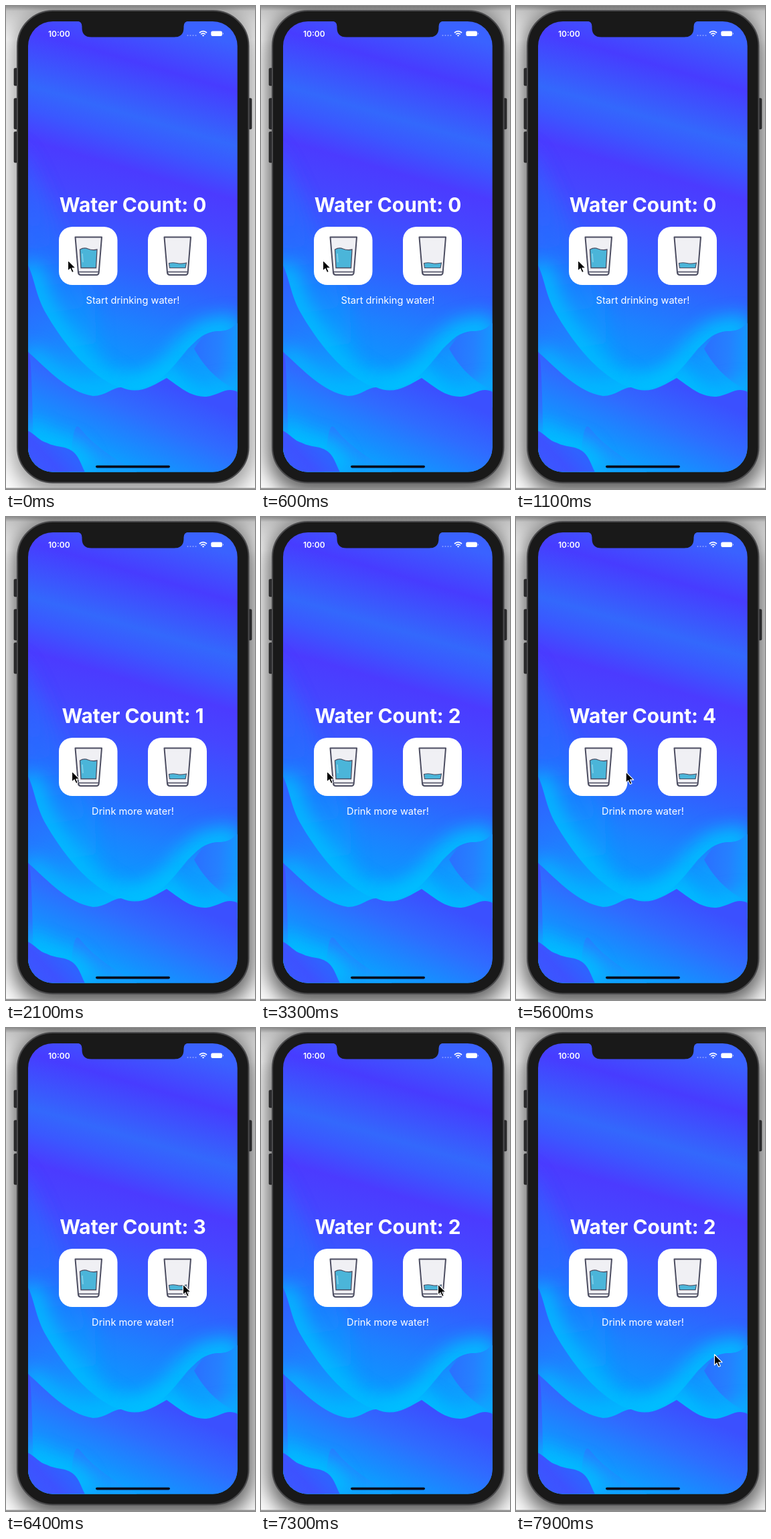
These frames come from a looping animation (372x722 px, 8 s). An HTML page:

```html
<!DOCTYPE html>
<html lang="en">
<head>
<meta charset="utf-8">
<style>
  html, body { margin: 0; width: 372px; height: 722px; overflow: hidden; background: #fff; }
  svg { display: block; }
  text { font-family: Inter, Roboto, sans-serif; fill: #fff; }
</style>
</head>
<body>
<svg width="372" height="722" viewBox="0 0 372 722">
  <defs>
    <filter id="blur" x="-30%" y="-20%" width="160%" height="140%"><feGaussianBlur stdDeviation="16"/></filter>
    <filter id="soft" x="-50%" y="-50%" width="200%" height="200%"><feGaussianBlur stdDeviation="14"/></filter>
    <clipPath id="screen"><rect x="33" y="23" width="312.700" height="673.500" rx="37"/></clipPath>
    <linearGradient id="top" x2="0" y2="1"><stop stop-color="#444" stop-opacity=".6"/><stop offset=".15" stop-color="#444" stop-opacity=".3"/><stop offset="1" stop-color="#444" stop-opacity="0"/></linearGradient>
    <path id="glass" d="M103.500 345.500h39.500l-4.500 56.500h-30.500z" fill="#f0f0f4"/>
    <g id="outline" fill="none" stroke="#4b4c60" stroke-width="2" stroke-linejoin="round" stroke-linecap="round">
      <path d="M103.500 345.500h39.500l-4.300 53q-.3 3.500-3.500 3.500h-23.500q-3.200 0-3.700-3.500z"/>
      <path d="M108.500 397.500h30" stroke-width="1.300"/>
    </g>
  </defs>

  <rect width="372" height="722" fill="#fff"/>
  <rect id="shadow" x="10" y="8" width="360" height="722" rx="60" filter="url(#blur)"/>
  <rect width="372" height="50" fill="url(#top)"/>
  <rect y="720.500" width="372" height="1.500" fill="#8d8d8d"/>

  <!-- Phone body -->
  <g fill="#2b2b2d" stroke="#151515" stroke-width=".6">
    <rect x="12" y="93" width="7" height="26" rx="1.500"/>
    <rect x="12" y="138" width="7" height="46" rx="1.500"/>
    <rect x="12" y="188" width="7" height="46" rx="1.500"/>
    <rect x="360" y="138" width="7" height="46" rx="1.500"/>
  </g>
  <rect x="17" y="7" width="345.500" height="705.500" rx="53" fill="#191919" stroke="#4a4a4c" stroke-width="2"/>

  <!-- Wallpaper -->
  <g clip-path="url(#screen)" id="wall"></g>

  <path d="M106 22.500q7.500 .5 7.500 8v2q0 14 14 14h124q14 0 14-14v-2q0-7.500 7.500-8z" fill="#191919"/>
  <text x="63" y="45.500" font-size="12" font-weight="600">10:00</text>
  <g fill="#fff" opacity=".4"><circle cx="271.500" cy="44" r="1"/><circle cx="275.500" cy="44" r="1"/><circle cx="279.500" cy="44" r="1"/><circle cx="283.500" cy="44" r="1"/></g>
  <path d="M289 40q5.500-4.800 11 0M291.200 42.300q3.300-2.800 6.600 0" fill="none" stroke="#fff" stroke-width="1.700"/>
  <path d="M294.600 45.600l-1.700-1.700q1.700-1.200 3.400 0z" fill="#fff"/>
  <rect x="306.300" y="37.500" width="16.700" height="7.500" rx="2.200" fill="#fff"/>
  <rect x="323.800" y="40" width="1.100" height="2.600" rx=".5" fill="#fff" opacity=".6"/>

  <text id="count" x="189.500" y="308" font-size="29.800" font-weight="700" text-anchor="middle"></text>
  <rect x="79" y="330" width="87.500" height="87" rx="20" fill="#fff"/>
  <rect x="212" y="330" width="88" height="87" rx="20" fill="#fff"/>
  <use href="#glass"/>
  <path d="M110.500 364q6-3.500 12-1t13.500 1l-1.500 27.500h-22.500z" fill="#4bb5d9" stroke="#4b4c60" stroke-width="1.300"/>
  <path d="M114 370l1 13" stroke="#8ad3ea" stroke-width="1.500"/>
  <use href="#outline"/>
  <g transform="translate(133)">
    <use href="#glass"/>
    <path d="M110.500 384.500q6-1.500 12 0t14-.5l-1.500 7.500h-23.500z" fill="#4bb5d9" stroke="#4b4c60" stroke-width="1.100"/>
    <use href="#outline"/>
  </g>
  <text id="hint" x="189.500" y="445.300" font-size="14.600" text-anchor="middle"></text>
  <rect x="134" y="686.800" width="111" height="3.600" rx="1.800" fill="#080c1c"/>
  <path id="cursor" d="M0 0v16l3.600-3.300 2.600 5.700 2.600-1.200-2.500-5.500h5.200z" fill="#000" stroke="#fff" stroke-width="1.100" stroke-linejoin="round"/>
</svg>
<script>
const $ = id => document.getElementById(id);
let layers = 0;

// One wallpaper layer: path, gradient line and colours ("#rgb@position" to place one)
function layer(d, [x1, y1, x2, y2], colors, extra = '') {
  const id = 'g' + layers++;
  const stops = colors.split(' ').map((c, i, all) => {
    const [color, at = i / (all.length - 1)] = c.split('@');
    return `<stop offset="${at}" stop-color="${color}"/>`;
  }).join('');
  return `<linearGradient id="${id}" gradientUnits="userSpaceOnUse" x1="${x1}" y1="${y1}" x2="${x2}" y2="${y2}">${stops}</linearGradient>
    <path d="${d}" fill="url(#${id})" ${extra}/>`;
}

// Light along an edge; the next layer covers its far side
const glow = (d, width, opacity) =>
  `<path d="${d}" fill="none" stroke="#00c0ff" stroke-width="${width}" opacity="${opacity}" filter="url(#soft)"/>`;

const left = 'M33 388C43 408 44 432 60 460C88 508 126 555 172 571';
const right = 'M172 570C222 582 246 543 272 512C287 498 296 486 320 486C334 486 340 479 346 474';
const gully = 'M281 512C291 531 312 560 346 574';
const ridge = 'M33 517C62 543 92 577 130 583C148 583 160 570 172 570C198 582 219 568 240 556C260 570 276 585 299 584C318 582 330 568 346 577';
const fold = 'M60 541C73 578 88 604 112 633C136 661 160 675 196 697';
const hill = 'M33 635C43 640 50 650 61 653C76 661 92 656 104 670C110 677 112 685 118 697';

$('wall').innerHTML =
  layer('M33 23H346V697H33Z', [209, 18, 52, 556],
    '#3a62ff #473cff@.12 #3368fc@.26 #3a58ff@.32 #4b3bff@.4 #4645ff@.49 #3160ff@.65 #1c82ff@.8 #00a6ff@1') +
  layer('M15 205C55 250 70 330 130 440L140 540L15 500Z', [33, 210, 80, 520], '#375bff #246fff #05a6ff', 'filter="url(#soft)" opacity=".75"') +
  glow(left, 34, .9) + glow(right, 40, .95) +
  layer(left + 'V600H33Z', [36, 415, 105, 575], '#2f62ff #1f80ff #06a8ff') +
  layer(right + 'V600H172Z', [325, 480, 260, 575], '#2e6cff #1888ff #00b0ff') +
  glow(gully, 16, .7) +
  layer(gully + 'V474C340 479 334 486 320 486C298 486 290 500 281 512Z', [285, 530, 346, 535], '#2a72ff #2580ff #129aff') +
  glow(ridge, 26, .85) +
  layer(ridge + 'V697H33Z', [215, 555, 150, 705], '#3b50ff #2f6cff@.35 #1590ff@.7 #00b2ff') +
  layer('M33 517C42 525 50 533 60 541' + fold.slice(6) + 'H33Z', [75, 545, 45, 660], '#3f50ff #2f70ff #10a0ff') +
  glow(hill, 30, .95) +
  layer(hill + 'H33Z', [85, 660, 45, 697], '#2f62ff #3d52ff #3a58ff');

// [time, count], then [start, end, x, y] for each pointer move
const counts = [[0, 0], [2000, 1], [2900, 2], [3700, 3], [4500, 4], [6300, 3], [7300, 2]];
const moves = [[0, 0, 92.5, 380], [1100, 1500, 98.5, 380], [5300, 6000, 264.5, 383], [7450, 7850, 296.5, 488]];
const ease = (t, a, b) => {
  const p = Math.min(1, Math.max(0, (t - a) / (b - a || 1)));
  return p * p * (3 - 2 * p);
};

function draw(now) {
  const t = now % 8000;
  const count = counts.filter(c => c[0] <= t).pop()[1];
  $('count').textContent = 'Water Count: ' + count;
  $('hint').textContent = count ? 'Drink more water!' : 'Start drinking water!';
  $('shadow').setAttribute('opacity', .4 + .25 * ease(t, 50, 350));
  let [, , x, y] = moves[0];
  for (const [a, b, toX, toY] of moves) {
    const p = ease(t, a, b);
    x += (toX - x) * p;
    y += (toY - y) * p;
  }
  $('cursor').setAttribute('transform', `translate(${x} ${y})`);
  requestAnimationFrame(draw);
}
draw(performance.now());
</script>
</body>
</html>
```
